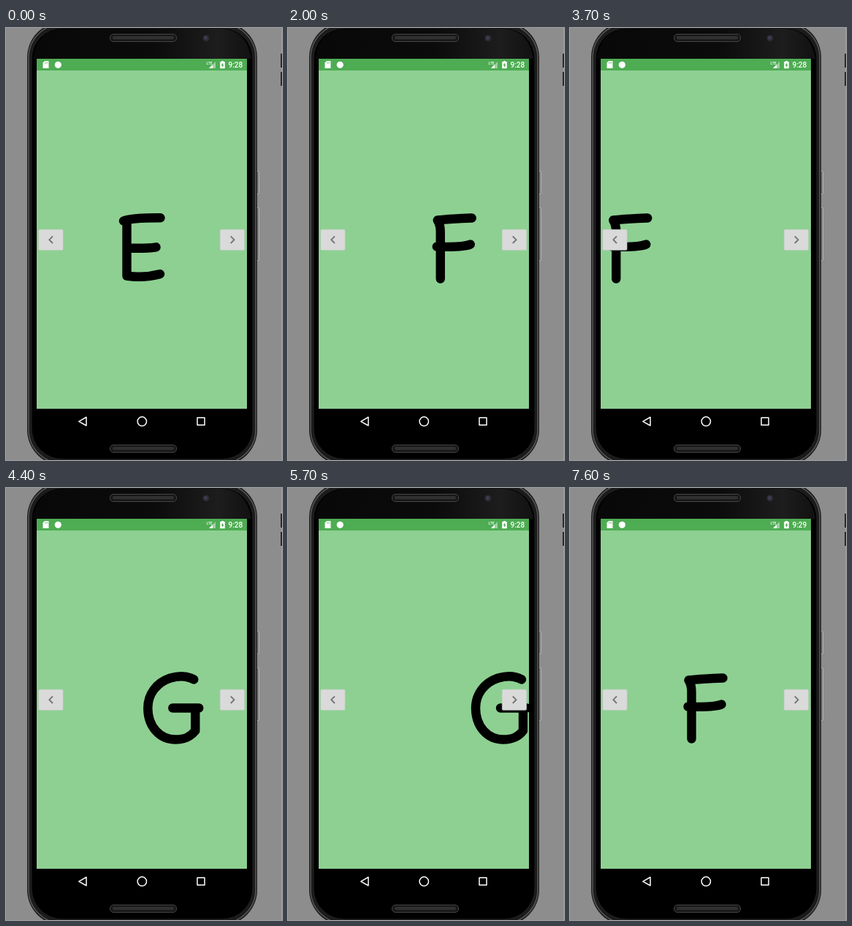
An HTML page for the animation above (8000 ms loop, 378 px wide and 590 px high).

```html
<!DOCTYPE html>
<html lang="en">
<head>
<meta charset="utf-8">
<title>Letter pager</title>
<style>
  html, body { margin: 0; width: 100%; height: 100%; overflow: hidden; background: #8d8d8d; }
  svg { display: block; width: 378px; height: 590px; }
  text { font-family: Roboto, Arial, sans-serif; fill: #fff; font-weight: 500; }
  .letter { fill: none; stroke: #000; stroke-width: 12.4; stroke-linecap: round; stroke-linejoin: round; }
  .line { fill: none; stroke: #fff; stroke-width: 1.5; stroke-linejoin: round; }
  .chevron { fill: none; stroke: #747474; stroke-width: 1.8; }
</style>
</head>
<body>
<svg viewBox="0 0 378 590">
  <defs>
    <linearGradient id="sheen" x1="0" y1="0" x2="1" y2="0">
      <stop offset="0" stop-color="#080808"/>
      <stop offset=".55" stop-color="#0b0b0b"/>
      <stop offset=".85" stop-color="#1d1d1d"/>
      <stop offset="1" stop-color="#111"/>
    </linearGradient>
    <clipPath id="screen"><rect x="42" y="58" width="288" height="462"/></clipPath>
    <g id="speaker">
      <rect x="142.5" y="8.5" width="91" height="10" rx="4.5" fill="#171717" stroke="#454545"/>
      <rect x="146" y="11" width="84" height="4.5" rx="2" fill="#303030"/>
    </g>
  </defs>

  <!-- backdrop -->
  <rect width="378" height="590" fill="#8d8d8d"/>
  <path d="M377.5 0V590" stroke="#9c9c9c"/>
  <path d="M377.2 35V54M377.2 60V79" stroke="#222" stroke-width="2"/>

  <!-- phone -->
  <g fill="#777" stroke="#b4b4b4">
    <rect x="342" y="195.5" width="4.5" height="31" rx="1"/>
    <rect x="342" y="245.5" width="4.5" height="72" rx="1"/>
  </g>
  <rect x="29" y="-8" width="315" height="605" rx="48" fill="#1b1b1b"/>
  <rect x="31" y="-5.5" width="311" height="600" rx="46" fill="none" stroke="#555" stroke-width="1.6"/>
  <rect x="35" y="0" width="303" height="589" rx="42" fill="#000" stroke="#222"/>
  <path d="M76 1H296Q330 3 336 42H37Q43 3 76 1Z" fill="url(#sheen)"/>
  <use href="#speaker"/>
  <use href="#speaker" y="561"/>
  <circle cx="274" cy="14" r="4.5" fill="#2a2a33"/>
  <circle cx="273.5" cy="13.5" r="2.5" fill="#3c3c52"/>

  <!-- status bar -->
  <rect x="42" y="42" width="288" height="16" fill="#4eac53"/>
  <path d="M53 45H58.5V55H50.5V47.5Z" fill="#fff"/>
  <path d="M53.5 46.5V48.5M55.2 46.5V48.5M56.9 46.5V48.5" stroke="#4eac53" stroke-width=".7"/>
  <circle cx="71.3" cy="50.3" r="4.6" fill="#fff"/>
  <text x="274.5" y="50" font-size="5">LTE</text>
  <path d="M287 46V55H278Z" fill="#fff" opacity=".45"/>
  <path d="M283 50V55H278Z" fill="#fff"/>
  <path d="M295 45H298V46H299.8V55.2H293.2V46H295Z" fill="#fff"/>
  <path d="M297.2 47.2L294.6 51.2H296.2V54L298.5 50.2H297.2Z" fill="#4eac53"/>
  <text id="clock" x="304.5" y="54" font-size="10">9:28</text>

  <!-- pages -->
  <rect x="42" y="58" width="288" height="462" fill="#8ed092"/>
  <g clip-path="url(#screen)">
    <path class="letter" d="M160.5 263Q172 258.5 211 258.8M165 264V338Q188 341.5 210.5 335.5M165 300Q190 301 205 298.8"/>
    <path class="letter" d="M162 262Q180 260 209 259M162 262Q166 268 166 278V342M161 298Q196 299.5 207 295"/>
    <path class="letter" d="M215 261C204 255 193 256 183 259C164 265 152 281 152 300C152 325 168 343 190 343C202 343 210 340 217 331V301M186 300H222"/>
  </g>
  <g fill="#dadada" stroke="#c6d2c7" stroke-width=".7">
    <rect x="44.8" y="275.3" width="33.2" height="28" rx="1.5"/>
    <rect x="293.3" y="275.3" width="33.2" height="28" rx="1.5"/>
  </g>
  <path class="chevron" d="M64 284.5L59.3 289.2L64 294M307.8 284.5L312.5 289.2L307.8 294"/>

  <!-- navigation -->
  <path class="line" d="M99.8 537.3L110 531.5V543Z"/>
  <circle class="line" cx="186.3" cy="537.3" r="6.2"/>
  <rect class="line" x="262" y="532.3" width="10" height="10"/>
</svg>
<script>
  const LOOP = 8000, STEP = 100, PAGE = 288, SETTLE_POWER = 2;
  const letters = document.querySelectorAll('.letter');
  const clock = document.getElementById('clock');

  // Each swipe: a finger drag over `reach` pixels, then a settle to the next page.
  const swipes = [
    { dir: 1, drag: [800, 1600], reach: 222, pace: 2, settle: [1700, 2200] },
    { dir: 1, drag: [3400, 4100], reach: 241, pace: 1, settle: [4300, 4600] },
    { dir: -1, drag: [5400, 6300], reach: 202, pace: 0.6, settle: [6300, 7000] }
  ];

  const progress = (t, [from, to]) => Math.min(1, Math.max(0, (t - from) / (to - from)));

  function travel(t, { dir, drag, reach, pace, settle }) {
    const dragged = reach * progress(t, drag) ** pace;
    const settled = (PAGE - reach) * progress(t, settle) ** SETTLE_POWER;
    return dir * (dragged + settled);
  }

  function draw(now) {
    const t = Math.floor(now % LOOP / STEP) * STEP;
    const scroll = swipes.reduce((sum, swipe) => sum + travel(t, swipe), 0);
    letters.forEach((el, i) =>
      el.setAttribute('transform', `translate(${i * PAGE - scroll + 0.5} 0.5)`));
    clock.textContent = t < 6000 ? '9:28' : '9:29';
  }

  const start = performance.now();
  function tick() {
    draw(performance.now() - start);
    requestAnimationFrame(tick);
  }
  tick();
</script>
</body>
</html>
```
